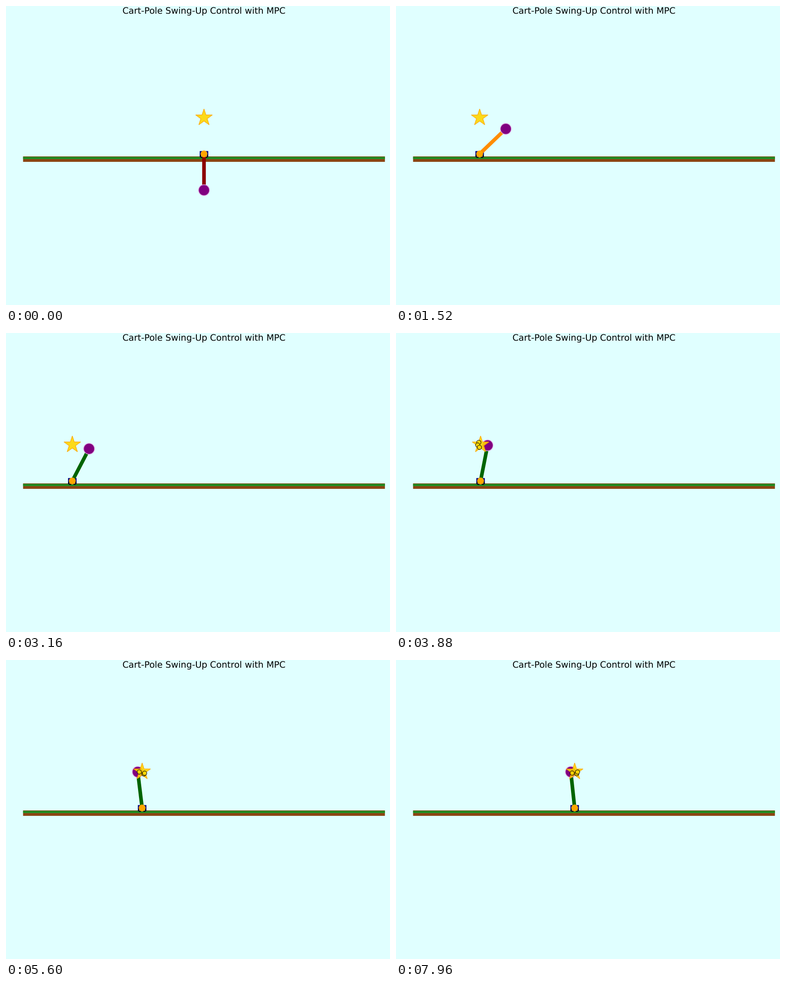
An HTML page that plays this animation: 849x660 px, repeating every 8000 ms.

```html
<!DOCTYPE html>
<html lang="en">
<head>
<meta charset="utf-8">
<title>Cart-Pole</title>
<style>
  html, body { margin: 0; width: 100%; height: 100%; overflow: hidden; background: #e0ffff; }
  svg { display: block; width: 849px; height: 660px; }
  text { font: 19.56px "DejaVu Sans", sans-serif; text-anchor: middle; text-rendering: geometricPrecision; }
</style>
</head>
<body>
<svg viewBox="0 0 849 660">
  <rect width="849" height="660" fill="#e0ffff"/>
  <text x="437.7" y="17">Cart-Pole Swing-Up Control with MPC</text>
  <rect x="37.75" y="332" width="800" height="12" fill="#8b4513"/>
  <rect x="37.75" y="333" width="800" height="5" fill="#228b22"/>
  <g id="cart">
    <rect x="-8" y="321.6" width="16" height="10.6" fill="#4169e1" stroke="#000080" stroke-width="2.8"/>
    <g fill="#808080" stroke="#000" stroke-width="2">
      <circle cx="-4.8" cy="331" r="3.2"/>
      <circle cx="4.8" cy="331" r="3.2"/>
    </g>
    <line id="rod" y1="326.5" stroke-width="8"/>
    <circle cy="326.5" r="7.5" fill="#ffa500"/>
    <circle id="bob" r="12" fill="#800080" stroke="#dda0dd" stroke-width="1.4"/>
    <polygon id="star" fill="#ffd700" stroke="#ffa500" stroke-width="1.4" stroke-linejoin="bevel" opacity=".9"/>
    <g id="sparks" fill="#ffd700" stroke="#000" stroke-width="1.4" opacity=".8">
      <circle r="4.8"/><circle r="4.8"/><circle r="4.8"/>
    </g>
  </g>
</svg>
<script>
const STEP = 40, LOOP = 8000;
const PIVOT_Y = 326.5, LENGTH = 80, STAR_Y = PIVOT_Y - LENGTH;
const RAD = Math.PI / 180;
const $ = id => document.getElementById(id);

// Each key is [step, value, velocity per step]; cubic in between.
function motion(...keys) {
  return t => {
    let i = 0;
    while (i < keys.length - 2 && t >= keys[i + 1][0]) i++;
    const [t0, a, va] = keys[i], [t1, b, vb] = keys[i + 1];
    const h = t1 - t0, u = (t - t0) / h, v = 1 - u;
    return v * v * ((1 + 2 * u) * a + u * h * va)
         + u * u * ((1 + 2 * v) * b - v * h * vb);
  };
}

// Kick left, brake, then drift right ever more slowly.
const cartX = motion([0, 437.75, -8], [21, 284, -7.2], [62, 131, 0],
  [110, 222.5, 2.75], [140, 301, 2.5], [199, 395, 1.1]);

// Degrees clockwise from upright: swing up, fall right, recover, lean left.
const poleAngle = motion([0, 180, 0], [21, 8, 2.8], [49, 55, 0], [79, 27.6, -1],
  [114, 0.4, -0.45], [150, -7.6, 0], [199, -6.1, 0.05]);

function random(seed) {
  const s = Math.sin(seed * 12.9898) * 43758.5453;
  return s - Math.floor(s);
}

function set(el, attrs) {
  for (const name in attrs) el.setAttribute(name, attrs[name]);
}

// Point at a clockwise angle from straight up.
const polar = (r, angle, cy) => [r * Math.sin(angle), cy - r * Math.cos(angle)];

function rodColor(tilt) {
  if (tilt < 0.5) return "#006400";
  return tilt < 1.5 ? "#ff8c00" : "#8b0000";
}

const cart = $("cart"), rod = $("rod"), bob = $("bob"), sparks = $("sparks");

set($("star"), {
  points: Array.from({ length: 10 }, (_, i) => polar(i % 2 ? 7.43 : 19.4, i * 36 * RAD, STAR_Y))
});

function draw(time) {
  const step = Math.floor((time % LOOP) / STEP);
  const angle = poleAngle(step) * RAD, tilt = Math.abs(angle);
  const [x, y] = polar(LENGTH, angle, PIVOT_Y);

  set(cart, { transform: `translate(${cartX(step)} 0)` });
  set(rod, { x2: x, y2: y, stroke: rodColor(tilt) });
  set(bob, { cx: x, cy: y });

  set(sparks, { visibility: tilt < 0.2 ? "visible" : "hidden" });
  [...sparks.children].forEach((spark, i) => {
    const [cx, cy] = polar(6.4, 2 * Math.PI * random(step * 3 + i + 1), STAR_Y);
    set(spark, { cx, cy });
  });
}

let start;
function tick(now) {
  start ??= now;
  draw(now - start);
  requestAnimationFrame(tick);
}
draw(0);
requestAnimationFrame(tick);
</script>
</body>
</html>
```
